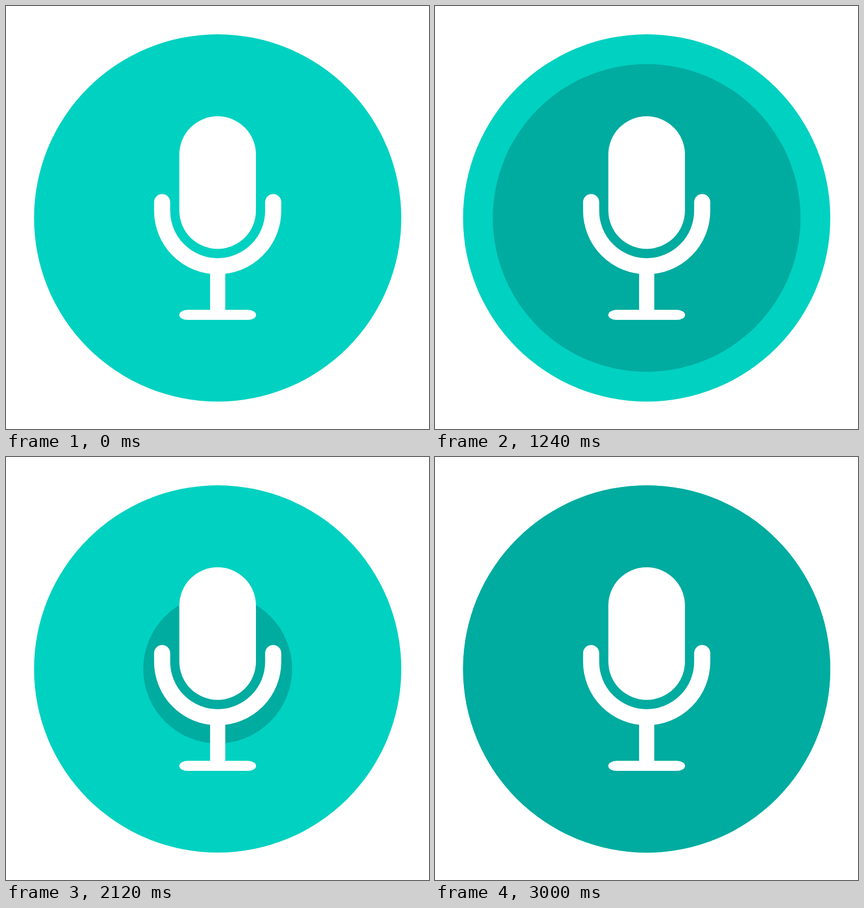
Recreate the animation shown at these times as an HTML page without scripts. Size 748 by 748 pixels, loop 3.04 s.

```html
<!DOCTYPE html>
<html lang="en">
<head>
<meta charset="utf-8">
<title>Microphone pulse</title>
<style>
  html, body {
    margin: 0;
    width: 100%;
    height: 100%;
    overflow: hidden;
    background: #fff;
  }
  svg {
    display: block;
    width: 100%;
    height: 100%;
  }
  .disc { fill: #00d1c1; }
  .pulse {
    fill: #00ab9f;
    /* 38 ticks of 40 ms, nudged 1 ms so ticks land safely */
    animation: grow 1520ms steps(38, end) -1ms infinite;
  }
  .mic { fill: #fff; }
  .cradle {
    fill: none;
    stroke: #fff;
    stroke-width: 28.5;
    stroke-linecap: round;
  }
  @keyframes grow {
    from { r: 0px; }
    to { r: 333.45px; }
  }
</style>
</head>
<body>
<svg viewBox="0 0 748 748">
  <circle class="disc" cx="374.3" cy="374.8" r="324.7"/>
  <circle class="pulse" cx="374.3" cy="374.8" r="0"/>
  <g class="mic">
    <rect x="306.5" y="195" width="135.5" height="234.5" rx="67.75"/>
    <path class="cradle" d="M276.1 346.8V362a98.2 98.2 0 0 0 196.4 0V346.8"/>
    <rect x="360.9" y="468" width="26.8" height="74"/>
    <rect x="306.4" y="537.3" width="135.8" height="17.8" rx="14.5" ry="8.9"/>
  </g>
</svg>
</body>
</html>
```
